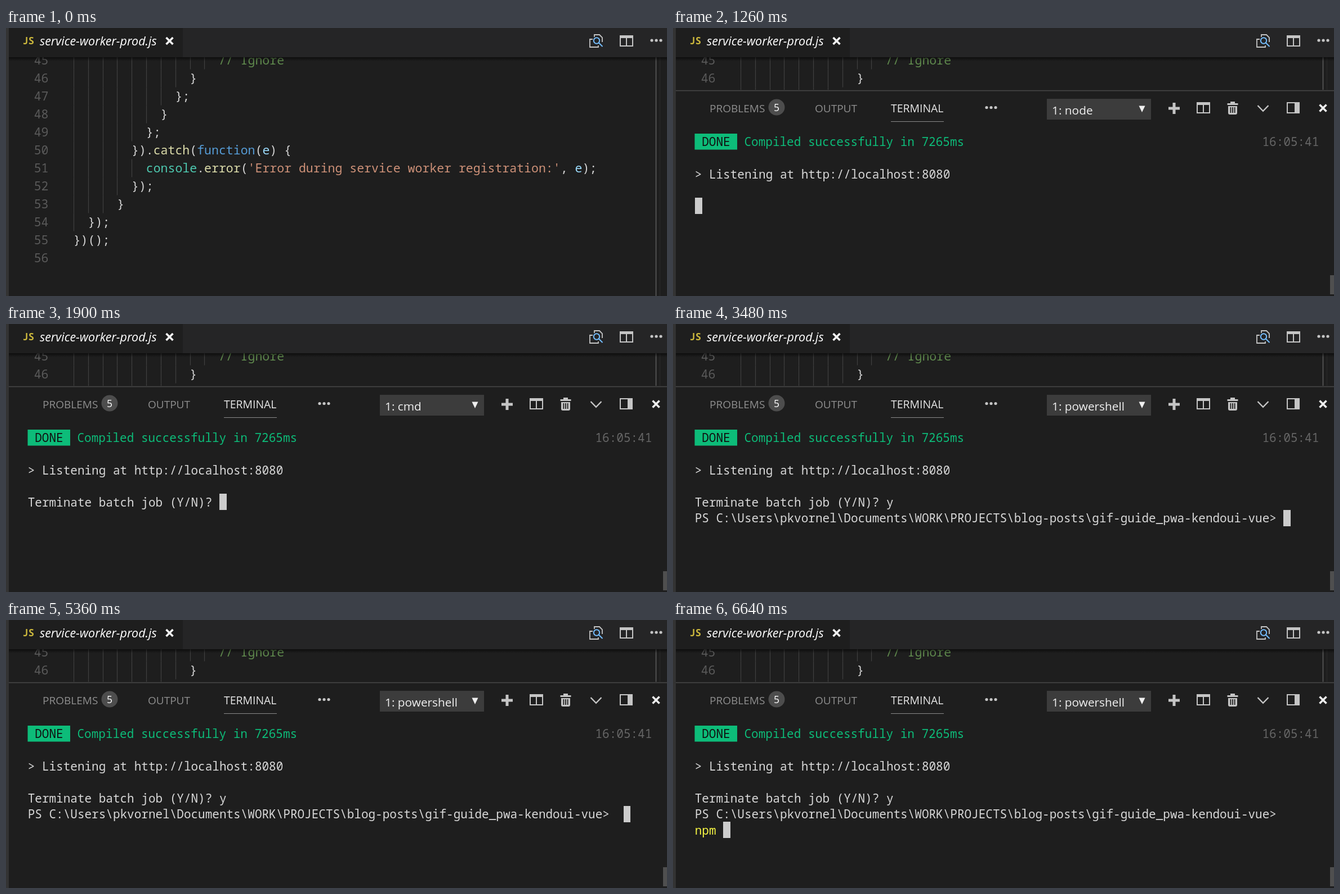
Write an HTML page that moves like this. It is 1174x477 px and loops after 8 s.

```html
<!DOCTYPE html>
<html lang="en">
<head>
<meta charset="utf-8">
<title>Terminal session</title>
<style>
  html, body { margin: 0; width: 100%; height: 100%; overflow: hidden; background: #1e1e1e; }
  svg { display: block; width: 1174px; height: 477px; }
  text { white-space: pre; font-family: "Open Sans", sans-serif; }
  .code text { font: 21.52px "Noto Sans Mono", monospace; }
  .term text { font: 21px "Noto Sans Mono", monospace; fill: #d8d8d8; }
</style>
</head>
<body>
<svg viewBox="0 0 1174 477">
  <defs>
    <linearGradient id="shade" x2="0" y2="1">
      <stop stop-color="#000" stop-opacity=".55"/>
      <stop offset="1" stop-color="#000" stop-opacity="0"/>
    </linearGradient>
    <path id="split" fill-rule="evenodd" d="M0 0h24v20H0zM2 5v13h9V5zM13 5v13h9V5z"/>
    <g id="dots"><circle r="2.6" cx="-8"/><circle r="2.6"/><circle r="2.6" cx="8"/></g>
    <path id="cross" d="M-6-6 6 6M6-6-6 6" fill="none" stroke="#f0f0f0" stroke-width="3.6"/>
  </defs>
  <rect width="1174" height="477" fill="#1e1e1e"/>

  <g id="editor" class="code"></g>
  <path d="M1161.5 52V477" stroke="#2b2b2b"/>
  <path d="M1154.5 52V477" stroke="#5a5a5a" stroke-width="1.6"/>
  <rect id="slider" x="1161" y="72" width="13" height="34" fill="#424242"/>

  <g id="panel">
    <rect y="110" width="1174" height="367" fill="#1e1e1e"/>
    <path d="M5 111.5H1174" stroke="#484848" stroke-width="1.6"/>
    <g font-size="19" fill="#8e8e8e">
      <text x="65" y="149.5">PROBLEMS</text>
      <text x="252" y="149.5">OUTPUT</text>
      <text x="387" y="149.5" font-size="19.4" fill="#e7e7e7">TERMINAL</text>
    </g>
    <path d="M387 166.5H481" stroke="#8a8a8a"/>
    <circle cx="184" cy="141" r="14.5" fill="#4d4d4d"/>
    <text x="184" y="147.5" font-size="17.5" fill="#fff" text-anchor="middle">5</text>
    <rect x="664" y="126" width="185" height="37" fill="#3c3c3c"/>
    <text id="shell" x="673" y="153.5" font-size="20.8" fill="#f0f0f0"></text>
    <path d="M827.5 138.5h11L833 150z" fill="#f0f0f0"/>
    <g fill="#c5c5c5">
      <use href="#dots" x="565" y="141.5"/>
      <path d="M887.5 133h5v7.5h7.5v5h-7.5v7.5h-5v-7.5H880v-5h7.5z"/>
      <use href="#split" x="930" y="132"/>
      <path fill-rule="evenodd" d="M990 131h8v3h5.5v3h-19v-3h5.5zM986 139h16v12q0 3-3 3h-10q-3 0-3-3zM989.5 141v10h1.8v-10zM993.1 141v10h1.8v-10zM996.7 141v10h1.8v-10z"/>
      <path d="M1038.5 138l9.500 9.800 9.500-9.800" fill="none" stroke="#c5c5c5" stroke-width="2.4"/>
      <path fill-rule="evenodd" d="M1090 132h23v20h-23zM1092 134v16h12V134z"/>
    </g>
    <use href="#cross" x="1154.5" y="142.5"/>

    <g class="term">
      <rect x="38.5" y="188" width="75.500" height="28.500" fill="#0dbc79"/>
      <text x="51.2" y="210" style="fill:#111">DONE</text>
      <text x="126.5" y="210" style="fill:#0dbc79">Compiled successfully in 7265ms</text>
      <text x="1046.5" y="210" style="fill:#666">16:05:41</text>
      <text x="38.7" y="267.5">&gt; Listening at http://localhost:8080</text>
      <text class="row" x="38.7" y="324.5"></text>
      <text class="row" x="38.7" y="353"></text>
      <text class="row" x="38.7" y="381.6" style="fill:#f5f543"></text>
      <rect id="cursor" height="29" fill="#ccc"/>
    </g>
    <rect x="1167" y="440" width="7" height="34" fill="#4f4f4f"/>
  </g>

  <rect y="52" width="1174" height="7" fill="url(#shade)"/>
  <rect width="1174" height="52" fill="#252526"/>
  <rect width="309" x="5" height="52" fill="#1e1e1e"/>
  <rect width="5" height="477" fill="#333"/>
  <text x="29.5" y="28.5" fill="#cdb93d" style="font:bold 17px 'Noto Sans Mono',monospace">JS</text>
  <text x="60" y="31" fill="#fff" font-size="21.5" font-style="italic">service-worker-prod.js</text>
  <use href="#cross" x="290.5" y="23"/>
  <g fill="none" stroke="#c5c5c5" stroke-width="1.8">
    <path d="M1045 16V12h9l5 5v8M1042 20h-5v14h15v-3"/>
    <g stroke="#75beff" stroke-width="2"><circle cx="1049" cy="22.5" r="5.2"/><path d="M1053 26.5l6.500 6.500"/></g>
  </g>
  <g fill="#c5c5c5">
    <use href="#split" x="1090" y="13"/>
    <use href="#dots" x="1155" y="22"/>
  </g>
</svg>
<script>
const $ = id => document.getElementById(id);
const LOOP = 8000, FIRST = 45, LINE = 32, CHAR = 12.91, CELL = 12.59;
const paint = (color, s) => `<tspan fill="${color}">${s}</tspan>`;

// Each entry: indent in columns, then markup
const lines = [
  [20, paint('#608b4e', '// Ignore')],
  [16, '}'], [14, '};'], [12, '}'], [10, '};'],
  [8, `}).${paint('#dcdcaa', 'catch')}(${paint('#569cd6', 'function')}(${paint('#9cdcfe', 'e')}) {`],
  [10, `${paint('#4ec9b0', 'console')}.${paint('#dcdcaa', 'error')}(${
    paint('#ce9178', "'Error during service worker registration:'")}, ${paint('#9cdcfe', 'e')});`],
  [8, '});'], [6, '}'], [2, '});'], [0, '})();'], [0, '']
];

$('editor').innerHTML = lines.map(([indent, markup], i) => {
  const top = 41.5 + i * LINE, base = top + 23.5;
  let guides = '';
  for (let col = 0; col < indent; col += 2)
    guides += `M${Math.round(120 + col * CHAR) + .5} ${top}v${LINE}`;
  return `<path d="${guides}" stroke="#404040" stroke-width="1.2"/>
    <text x="75.5" y="${base}" fill="#5a5a5a" text-anchor="end">${FIRST + i}</text>
    <text x="${119.7 + indent * CHAR}" y="${base}" fill="#d4d4d4">${markup}</text>`;
}).join('');

const ask = 'Terminate batch job (Y/N)? ';
const prompt = ask + 'y\n' +
  String.raw`PS C:\Users\pkvornel\Documents\WORK\PROJECTS\blog-posts\gif-guide_pwa-kendoui-vue> `;

// Start time, shell name, terminal text; the cursor sits at the end of the text
const steps = [
  [0, 'node', ''],
  [1900, 'cmd', ask],
  [3160, 'cmd', ask + 'y'],
  [3480, 'powershell', prompt],
  [5360, 'powershell', prompt + ' '],
  [5680, 'powershell', prompt + '  '],
  [5970, 'powershell', prompt + '\n'],
  [6290, 'powershell', prompt + '\nn'],
  [6640, 'powershell', prompt + '\nnpm ']
];
const rows = document.querySelectorAll('.row');
const cellX = col => Math.round(39 + col * CELL);

function draw(t) {
  const [, shell, typed] = steps.findLast(step => t >= step[0]);
  const output = typed.split('\n'), last = output.length - 1, col = output[last].length;
  $('panel').style.display = t < 320 ? 'none' : '';
  $('slider').style.opacity = t < 320 || t >= 1260 ? 0 : t < 640 ? 1 : .5;
  $('shell').textContent = '1: ' + shell;
  rows.forEach((row, i) => row.textContent = output[i] || '');
  $('cursor').setAttribute('x', cellX(col));
  $('cursor').setAttribute('width', cellX(col + 1) - cellX(col));
  $('cursor').setAttribute('y', Math.round(302.2 + last * 28.6));
}

function tick() {
  draw(performance.now() % LOOP);
  requestAnimationFrame(tick);
}
tick();
</script>
</body>
</html>
```
